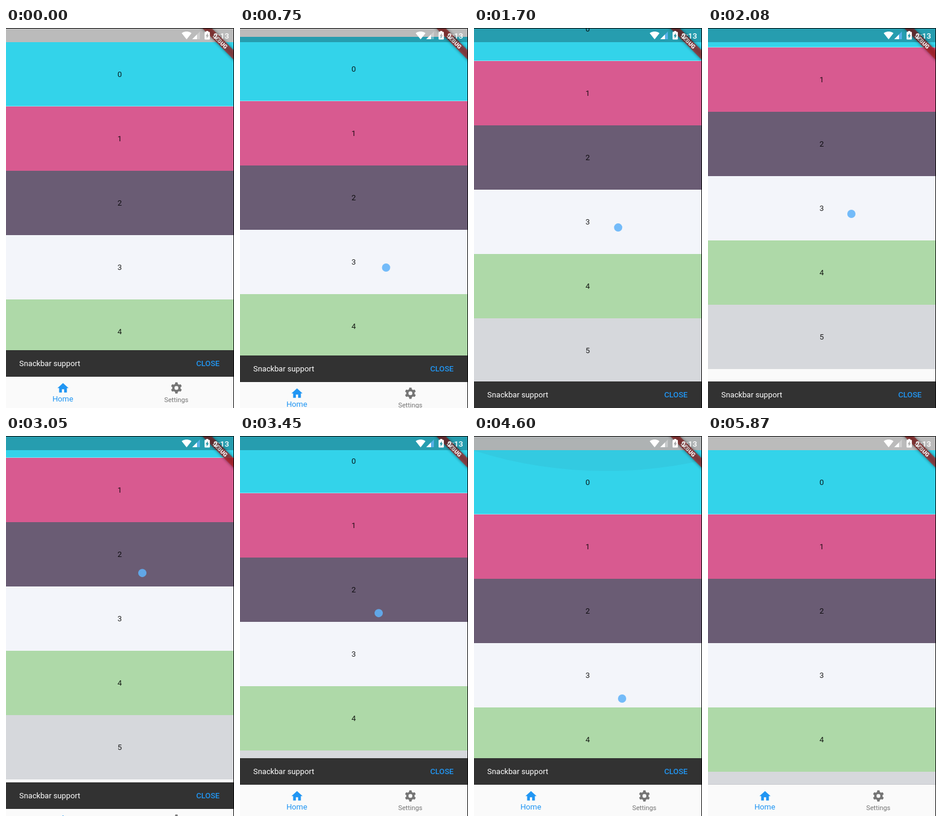
An HTML page for the animation above (7720 ms loop, 388 by 644 pixels).

```html
<!DOCTYPE html>
<html lang="en">
<head>
<meta charset="utf-8">
<title>Scrolling list with snackbar</title>
<style>
  html, body { margin: 0; width: 100%; height: 100%; overflow: hidden; background: #fafafa; }
  svg { display: block; font: 13.2px Roboto, sans-serif; }
  .mid { text-anchor: middle; }
  .medium { font-weight: 500; }
</style>
</head>
<body>
<svg width="388" height="644" viewBox="0 0 388 644">
  <defs>
    <filter id="blur" x="-20%" y="-80%" width="140%" height="260%"><feGaussianBlur stdDeviation="2.4"/></filter>
  </defs>
  <rect width="388" height="644" fill="#fafafa"/>
  <g id="list"></g>
  <ellipse id="glow" cx="225" rx="582" fill="#3c6e82"/>

  <g id="snack">
    <rect y="546" width="388" height="45" fill="#323232"/>
    <g id="snackText">
      <text x="22.6" y="573" fill="#fff">Snackbar support</text>
      <text x="323.7" y="573" class="medium" fill="#2196f3">CLOSE</text>
    </g>
  </g>

  <g id="nav">
    <rect y="590.5" width="388" height="1" fill="#000" opacity=".12"/>
    <rect y="591" width="388" height="54" fill="#fafafa"/>
    <g class="mid">
      <path transform="translate(85.7 599) scale(.943)" fill="#2196f3" d="M10 20v-6h4v6h5v-8h3L12 3 2 12h3v8z"/>
      <text x="96.7" y="633" fill="#2196f3">Home</text>
      <g transform="translate(290 610)" fill="#757575">
        <g id="gear"></g>
        <circle r="5.2" fill="none" stroke="#757575" stroke-width="3.8"/>
      </g>
      <text x="289.8" y="633.8" font-size="11.3" fill="#757575">Settings</text>
    </g>
  </g>

  <circle id="dot" r="7" fill="#5fb2f8"/>

  <g transform="translate(387 0) rotate(45)">
    <rect x="-60" y="26.4" width="120" height="11.3" opacity=".5" filter="url(#blur)"/>
    <rect x="-60" y="26.4" width="120" height="11.3" fill="#b71c1c" opacity=".63"/>
    <text class="mid" y="35.4" font-size="9.6" font-weight="900" fill="#fff">DEBUG</text>
  </g>

  <rect width="388" height="24" opacity=".255"/>
  <g fill="#fff">
    <path transform="translate(298.7 3.8) scale(.72)" d="M12 21.5L23.64 7C23.2 6.7 18.7 3 12 3S.8 6.7.36 7z"/>
    <path id="signal" d="M330 6V19H317z"/>
    <path d="M325 11V19H317z"/>
    <path transform="translate(331.6 3.6) scale(.9 .72)" fill-rule="evenodd" d="M15.7 4H14V2h-4v2H8.3Q7 4 7 5.3v15.4Q7 22 8.3 22h7.4q1.3 0 1.3-1.3V5.3Q17 4 15.7 4zM11 20v-5.5H9L13 7v5.5h2z"/>
    <text x="353" y="18" class="medium" font-size="13.5">2:13</text>
  </g>
  <path d="M0 .5H387.5V644" fill="none" stroke="#000"/>
</svg>
<script>
const LOOP = 7720, ROW = 109, TOP = 24, MAX_SCROLL = 108, NAV = 53, SNACK = 45;
const $ = id => document.getElementById(id);
const set = (el, attrs) => { for (const k in attrs) el.setAttribute(k, attrs[k]); };
const clamp = (v, lo = 0, hi = 1) => Math.min(hi, Math.max(lo, v));
const ramp = (t, from, to) => clamp((t - from) / (to - from));

const colors = ['#33d3ea', '#d85a90', '#6a5c74', '#f3f5fa', '#aed9a8', '#d6d8dc'];
$('list').innerHTML = colors.map((c, i) => {
  const y = TOP + i * ROW;
  return `<rect y="${y}" width="388" height="${ROW}" fill="${c}"/>
    <text class="mid" x="193.5" y="${y + 58.7}" fill-opacity=".87">${i}</text>`;
}).join('') + `<rect y="${TOP + ROW - 1}" width="388" height="1" fill="#fff" opacity=".4"/>`;

$('gear').innerHTML = [0, 60, 120].map(a =>
  `<path transform="rotate(${a})" d="M-1.9 -9.4H1.9L2.6 -6H-2.6zM-1.9 9.4H1.9L2.6 6H-2.6z"/>`).join('');

// Each row: time, then values to interpolate
const scrollKeys = [[220, 0], [600, 0], [950, 21], [1250, 46], [1790, 83], [2080, 100], [2520, MAX_SCROLL],
  [2940, MAX_SCROLL], [3050, 96], [3450, 36], [3700, 7], [3790, 0]];
const dragUp = [[220, 250, 432], [600, 249, 415], [950, 248, 394], [1250, 247, 369], [1790, 245, 332],
  [2080, 244, 315], [2520, 243, 307]];
const dragDown = [[2880, 231, 205], [3050, 232, 232], [3450, 236, 300], [3790, 241, 346],
  [4600, 252, 445], [4900, 253, 459], [5230, 253, 462]];

function track(keys, t) {
  const n = keys.findIndex(k => k[0] > t);
  if (n === 0) return keys[0].slice(1);
  if (n < 0) return keys.at(-1).slice(1);
  const a = keys[n - 1], b = keys[n], p = ramp(t, a[0], b[0]);
  return a.slice(1).map((v, i) => v + (b[i + 1] - v) * p);
}

// Cubic bezier (.4, 0, .2, 1), solved for x by bisection
function fastOutSlowIn(x) {
  let lo = 0, hi = 1, u = .5;
  for (let i = 0; i < 20; i++) {
    u = (lo + hi) / 2;
    const bx = 1.2 * u * (1 - u) ** 2 + .6 * u * u * (1 - u) + u ** 3;
    if (bx < x) lo = u; else hi = u;
  }
  return 3 * u * u * (1 - u) + u ** 3;
}

function draw(t) {
  const scroll = Math.round(track(scrollKeys, t)[0]);
  const hidden = clamp(t < 2700 ? scroll : NAV - (MAX_SCROLL - scroll), 0, NAV);
  set($('list'), { transform: `translate(0 ${-scroll})` });
  set($('nav'), { transform: `translate(0 ${hidden})` });

  const shown = 1 - ramp(t, 5370, 5870);
  const height = SNACK * fastOutSlowIn(shown);
  set($('snack'), { transform: `translate(0 ${hidden + SNACK - height})`, visibility: shown ? 'visible' : 'hidden' });
  set($('snackText'), { opacity: fastOutSlowIn(ramp(shown, .72, 1)) });

  const touching = (t >= 220 && t < 2520) || (t >= 2880 && t < 5230);
  const [x, y] = track(t < 2700 ? dragUp : dragDown, t);
  set($('dot'), { cx: x, cy: y, opacity: touching ? .87 : 0 });

  const pull = .76 * Math.sqrt(ramp(t, 3750, 4550));
  const fade = ramp(t, 3750, 4000) * (1 - ramp(t, 4650, 5200));
  set($('glow'), { cy: -504 * pull, ry: 582 * pull, opacity: .09 * fade });

  const covered = scroll > 12;
  set($('signal'), { fill: covered ? '#64b5f6' : '#fff', opacity: covered ? .8 : .3 });
}

const start = performance.now();
function frame() {
  draw((performance.now() - start) % LOOP);
  requestAnimationFrame(frame);
}
frame();
</script>
</body>
</html>
```
